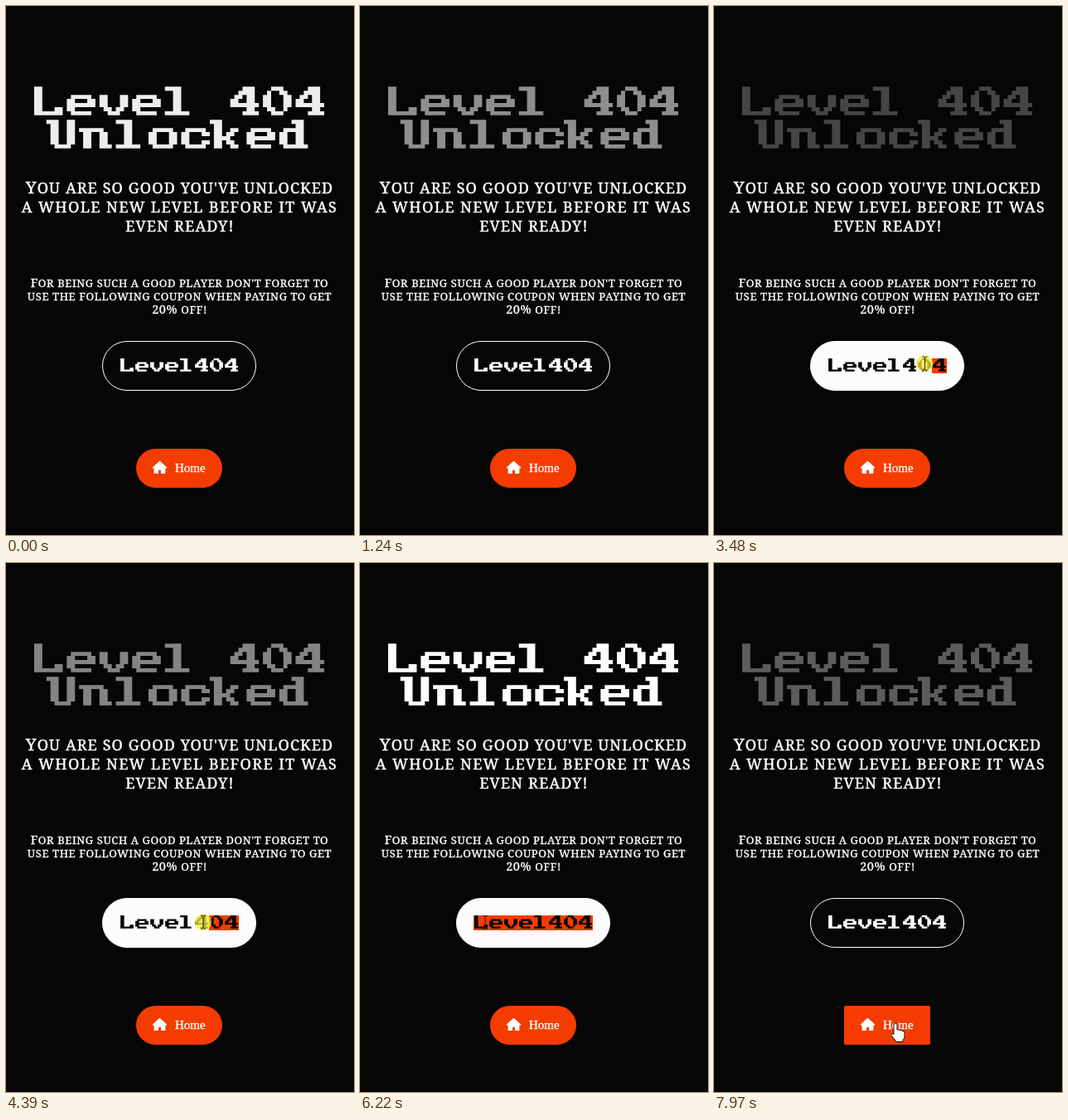
Animation of 420 by 638 pixels, one loop 8000 ms. Source, as an HTML page:

```html
<!DOCTYPE html>
<html lang="en">
<head>
<meta charset="utf-8">
<title>Level 404</title>
<style>
  html, body { margin: 0; width: 100%; height: 100%; overflow: hidden; background: #060606; }
  svg { display: block; width: 100vw; height: 100vh; }
  .caps { font-family: "Noto Serif", serif; fill: #fff; stroke: #fff; text-anchor: middle; text-transform: uppercase; }
  .lead { font-size: 18px; letter-spacing: 1.2px; stroke-width: .45px; }
  .lead .big { font-size: 20.5px; }
  .note { font-size: 13px; letter-spacing: .6px; stroke-width: .35px; }
  .note .big { font-size: 14.5px; }
  .home { font: 15px "Liberation Serif", serif; fill: #fff; stroke: #fff; stroke-width: .3px; }
</style>
</head>
<body>
<svg viewBox="0 0 420 638">
  <rect width="420" height="638" fill="#060606"/>
  <g id="title" role="img" aria-label="Level 404 Unlocked" fill="#fff"></g>

  <g class="caps lead">
    <text x="209.5" y="226" style="letter-spacing:1.1px"><tspan class="big">Y</tspan>ou are so good you've unlocked</text>
    <text x="209.5" y="249" style="letter-spacing:1.42px">a whole new level before it was</text>
    <text x="210" y="272">even ready!</text>
  </g>
  <g class="caps note">
    <text x="209.5" y="339"><tspan class="big">F</tspan>or being such a good player don't forget to</text>
    <text x="209.5" y="355">use the following coupon when paying to get</text>
    <text x="209.5" y="371"><tspan class="big">20%</tspan> off!</text>
  </g>

  <rect id="pill" x="116.5" y="404.5" width="185" height="59" rx="29.5" stroke="#fff"/>
  <rect id="sel" y="425" height="18" fill="#f43c00"/>
  <g id="code" role="img" aria-label="Level404"></g>

  <rect id="btn" x="157" y="534" width="104" height="47" fill="#f43c00"/>
  <path d="M185.500 549.500l8 7.200h-1.800v6.600h-4v-4.300h-4.400v4.300h-4v-6.600h-1.800z" fill="#fff" stroke="#fff" stroke-width="1.400" stroke-linejoin="round"/>
  <text class="home" x="204" y="562">Home</text>

  <g id="cursor">
    <circle id="press" r="10" fill="#f7ec33" opacity=".75"/>
    <path id="arrow" d="M0 0v15.500l3.600-3.400 2.900 6 2.300-1.100-2.900-5.800h5z" fill="#fff" stroke="#111" stroke-width=".7"/>
    <path id="beam" d="M-3-8h2l1 1 1-1h2M0-7v14M-3 8h2l1-1 1 1h2" fill="none" stroke="#222"/>
    <path id="hand" d="M-2 2a2 2 0 0 1 4 0v6q2-1 3 .5 2-1 3 1 3-1 3 2v4q0 3-2 5v2h-8q-2-3-6-8 0-3 3-1z" fill="#fff" stroke="#111" stroke-linejoin="round"/>
  </g>
</svg>
<script>
const LOOP = 8000;
const $ = id => document.getElementById(id);

// Letter outlines on an 8 x 8 unit cell
const GLYPHS = {
  L: 'M0 0h2v6h3v-1h2v2h-7z',
  U: 'M-1 0h3v6h2v-6h2v6h-1v1h-4v-1h-1v-5h-1z',
  e: 'M1 2h5v1h1v2h-5v1h4v1h-5v-1h-1v-3h1zM2 3h3v1h-3z',
  v: 'M0 2h2v3h1v1h1v-1h1v-3h2v3h-1v1h-1v1h-3v-1h-1v-1h-1z',
  l: 'M0 0h4v6h2v1h-6v-1h2v-5h-2z',
  n: 'M-1 2h6v1h1v3h1v1h-3v-4h-2v4h-2v-4h-1z',
  o: 'M1 2h5v1h1v3h-1v1h-5v-1h-1v-3h1zM2 3h3v3h-3z',
  c: 'M1 2h5v1h1v1h-2v-1h-3v3h3v-1h2v1h-1v1h-5v-1h-1v-3h1z',
  k: 'M-1 0h3v4h1v-1h1v-1h2v1h-1v1h-1v1h1v1h1v1h-2v-1h-1v-1h-1v2h-2v-6h-1z',
  d: 'M3 0h3v6h1v1h-6v-1h-1v-3h1v-1h3v-1h-1zM2 3h2v3h-2z',
  4: 'M3 0h3v4h1v1h-1v1h1v1h-4v-1h1v-1h-4v-2h1v-1h1v-1h1zM3 2h1v2h-2v-1h1z',
  0: 'M2 0h3v1h1v1h1v3h-1v1h-1v1h-3v-1h-1v-1h-1v-3h1v-1h1zM2 1h2v1h1v4h-2v-1h-1z'
};

function write(group, text, mid, y, size) {
  const unit = size / 8, left = mid - text.length * size / 2 + unit / 2;
  [...text].forEach((ch, i) => {
    if (!GLYPHS[ch]) return;
    const p = document.createElementNS(group.namespaceURI, 'path');
    p.setAttribute('d', GLYPHS[ch]);
    p.setAttribute('fill-rule', 'evenodd');
    p.setAttribute('transform', `translate(${left + i * size} ${y}) scale(${unit})`);
    group.append(p);
  });
}
write($('title'), 'Level 404', 209, 97.3, 39.45);
write($('title'), 'Unlocked', 209, 137.3, 39.45);
write($('code'), 'Level404', 209, 425, 18);

// Pointer way points: time, x, y
const WAY = [
  [1860, 424, 376], [2070, 349, 395], [2140, 322.5, 404.5], [2260, 300, 416],
  [2700, 276, 430], [3000, 281, 433], [3480, 254.5, 431], [4300, 240, 433],
  [5370, 217, 435], [6000, 140, 434], [6400, 160, 433], [6600, 215, 440],
  [6760, 255, 466], [6870, 274, 495], [6980, 252, 543], [7060, 226, 548],
  [7500, 220, 552], [7970, 219, 555], [8000, 219, 555]
];
const ramp = (t, start, span) => Math.min(1, Math.max(0, (t - start) / span));
const ease = u => u * u * (3 - 2 * u);
const grey = v => `rgb(${v},${v},${v})`;
const show = (id, on) => $(id).setAttribute('display', on ? 'inline' : 'none');

function pointer(t) {
  const i = Math.max(1, WAY.findIndex(w => w[0] >= t));
  const [a, x, y] = WAY[i - 1], [b, x2, y2] = WAY[i], u = ramp(t, a, b - a);
  return [x + (x2 - x) * u, y + (y2 - y) * u];
}

function draw(t) {
  // Linear blink, darkest at 486 ms
  const phase = ((t - 486) / 1043 + 2) % 1;
  $('title').setAttribute('opacity', 1 - Math.abs(1 - 2 * phase));

  const hover = ease(ramp(t, 2260, 600)) - ease(ramp(t, 6730, 600));
  $('pill').setAttribute('fill', grey(Math.round(6 + 246 * hover)));
  $('code').setAttribute('fill', grey(Math.round(255 - 250 * hover)));
  $('btn').setAttribute('rx', 23.5 - 22 * ease(ramp(t, 7040, 1000)));

  const [x, y] = pointer(t);
  const drag = pointer(Math.min(t, 6000))[0];
  const cell = Math.min(8, Math.max(0, Math.round((drag - 137) / 18)));
  const picked = t > 3050 && t < 6300;
  $('sel').setAttribute('x', 137 + 18 * cell);
  $('sel').setAttribute('width', picked ? 18 * (8 - cell) : 0);

  const onText = x > 137 && x < 282 && y > 423 && y < 443;
  const onHome = x > 157 && x < 261 && y > 534;
  $('cursor').setAttribute('transform', `translate(${x} ${y})`);
  show('cursor', t >= 1860);
  show('press', t > 3050 && t < 6100);
  show('beam', onText);
  show('hand', onHome);
  show('arrow', !onText && !onHome);
}

function tick() {
  draw(performance.now() % LOOP);
  requestAnimationFrame(tick);
}
tick();
</script>
</body>
</html>
```
